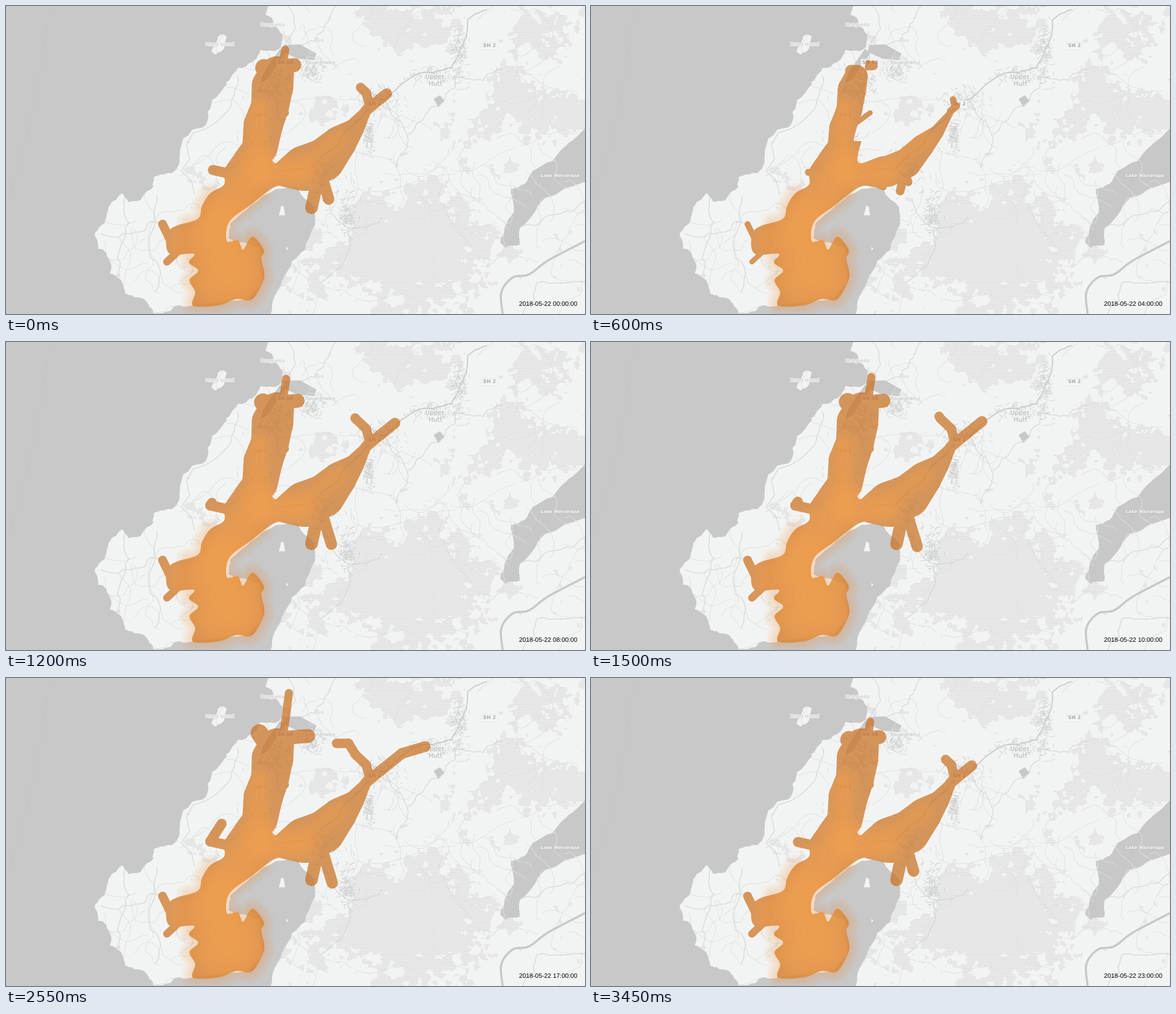
These frames come from a looping animation (921x490 px, 3.6 s). A matplotlib script:

```python
import numpy as np
import matplotlib.pyplot as plt
from matplotlib.animation import FuncAnimation
from matplotlib.collections import LineCollection
from matplotlib.patches import PathPatch
from matplotlib.path import Path
from matplotlib.patheffects import withStroke

W, H, DPI = 921, 490, 128
PX = 72 / DPI
HOURS, STEP_MS = 24, 150
plt.rcParams["text.hinting"] = "none"
rng = np.random.default_rng(7)

fig = plt.figure(figsize=(W / DPI, H / DPI), dpi=DPI, facecolor="#c8c8c8")
ax = fig.add_axes([0, 0, 1, 1])
ax.axis("off")


# ---------- geometry helpers ----------
def pts(*xy):
    return np.array(xy, float).reshape(-1, 2)


def smooth(p, sub=6):
    """Open Catmull-Rom curve through the points."""
    q = np.vstack([p[:1], p, p[-1:]])
    t = (np.arange(sub) / sub)[:, None]
    out = [b + 0.5 * t * (c - a + t * (2*a - 5*b + 4*c - d + t * (3*(b - c) + d - a)))
           for a, b, c, d in zip(q, q[1:], q[2:], q[3:])]
    return np.vstack(out + [p[-1:]])


def rough(p, amp=0.1, depth=3):
    """Midpoint displacement, for coastlines and winding roads."""
    for _ in range(depth):
        d = np.diff(p, axis=0)
        mid = (p[1:] + p[:-1]) / 2 + np.c_[-d[:, 1], d[:, 0]] * rng.normal(0, amp, (len(d), 1))
        out = np.empty((len(p) + len(mid), 2))
        out[::2], out[1::2] = p, mid
        p = out
    return p


def cut(p, share):
    """The first share of a polyline, measured along its length."""
    s = np.r_[0, np.cumsum(np.hypot(*np.diff(p, axis=0).T))]
    u = np.r_[s[s < share * s[-1]], share * s[-1]]
    return np.c_[np.interp(u, s, p[:, 0]), np.interp(u, s, p[:, 1])]


def capsule(a, b, ra, rb):
    """Outline around two circles."""
    d = max(np.hypot(*(b - a)), 1e-6)
    heading = np.arctan2(b[1] - a[1], b[0] - a[0])
    beta = np.arccos(np.clip((ra - rb) / d, -1, 1))
    front = heading + np.linspace(-beta, beta, 16)
    back = heading + np.linspace(beta, 2 * np.pi - beta, 16)
    return np.vstack([b + rb * np.c_[np.cos(front), np.sin(front)],
                      a + ra * np.c_[np.cos(back), np.sin(back)]])


def chain(p, radii):
    return [capsule(*link) for link in zip(p, p[1:], radii, radii[1:])]


def union(polys):
    """Compound path with every ring wound the same way."""
    rings = []
    for p in polys:
        x, y = p.T
        turn = np.sum(x * np.roll(y, -1) - y * np.roll(x, -1))
        p = p if turn > 0 else p[::-1]
        rings.append(Path(np.vstack([p, p[:1]]), closed=True))
    return Path.make_compound_path(*rings)


def area(polys, color, z):
    return ax.add_patch(PathPatch(union(polys), fc=color, ec="none", zorder=z))


def lines(paths, color, width, z, clip=None, **kw):
    col = ax.add_collection(LineCollection(paths, colors=color, linewidths=width * PX,
                                           zorder=z, **kw))
    if clip is not None:
        col.set_clip_path(clip)


def noise(cell):
    """Smooth random field over the stage."""
    grid = rng.normal(size=(H // cell + 2, W // cell + 2))
    y, x = np.arange(H) / cell, np.arange(W) / cell
    i, j = y.astype(int), x.astype(int)
    v, u = (y - i)[:, None], x - j
    top = grid[i][:, j] * (1 - u) + grid[i][:, j + 1] * u
    low = grid[i + 1][:, j] * (1 - u) + grid[i + 1][:, j + 1] * u
    return top * (1 - v) + low * v


yy, xx = np.mgrid[0:H, 0:W] + 0.5

# ---------- land and water ----------
west_coast = pts(417, 0, 413, 14, 440, 45, 437, 66, 405, 70, 394, 88, 368, 99, 347, 129, 322, 176,
                 318, 189, 296, 197, 264, 266, 235, 272, 234, 288, 196, 312, 184, 298, 162, 325,
                 142, 360, 146, 386, 160, 394, 165, 425, 190, 458, 212, 464, 234, 489, 290, 478)
bay = pts(300, 476, 385, 467, 408, 438, 405, 385, 354, 370, 357, 346, 390, 317, 430, 291, 465, 291,
          490, 320, 492, 347, 476, 388, 455, 406, 440, 436, 427, 462, 421, 490)
mana = pts(341, 46, 351, 50, 345, 70, 333, 77, 327, 73, 341, 46)
somes = pts(438, 317, 442, 320, 444, 333, 434, 333)
ward = pts(446, 383, 449, 386, 446, 389)
land = area([np.vstack([rough(west_coast), rough(bay, 0.05, 2), pts(W, H, W, 0)]),
             rough(mana), somes, ward], "#f2f4f3", 1)
lake = pts(W, 194, 892, 221, 838, 262, 803, 292, 808, 328, 786, 376, 794, 384, 817, 380, 817, 354,
           850, 313, 890, 290, W, 280)
inlet = pts(442, 62, 468, 61, 494, 76, 490, 86, 464, 84, 440, 73)
arm = pts(436, 68, 444, 76, 414, 118, 404, 122, 412, 102)
pond = pts(680, 148, 690, 142, 697, 150, 688, 161)
area([rough(lake, 0.05), inlet, arm, pond], "#c8c8c8", 3)

# Wooded hills: x, y, spread x, spread y, density
cover = 0.28 * noise(26) + 0.22 * noise(9) + 0.12 * noise(4)
for x, y, sx, sy, density in [(655, 390, 105, 110, 1.5), (640, 35, 85, 55, 1.0),
                              (850, 45, 75, 50, 0.9), (815, 165, 110, 60, 1.0),
                              (500, 168, 45, 28, 0.8), (475, 430, 45, 70, 0.7)]:
    cover += density * np.exp(-((xx - x) / sx) ** 2 - ((yy - y) / sy) ** 2)
woods = np.zeros((H, W, 4))
woods[..., :3] = np.where(np.arange(H) % 3 == 0, 0.878, 0.918)[:, None, None]
woods[..., 3] = cover > 0.55
ax.imshow(woods, extent=(0, W, H, 0), zorder=2, interpolation="nearest",
          aspect="auto").set_clip_path(land)

# ---------- roads ----------
tracks = []
for _ in range(120):
    heading = np.cumsum(rng.normal(0, 0.3, 26)) + rng.uniform(0, 2 * np.pi)
    steps = 4 * np.c_[np.cos(heading), np.sin(heading)]
    tracks.append(rng.uniform((150, 0), (W, H)) + np.cumsum(steps, axis=0))
lines(tracks, "#dfe1e1", 0.9, 3.1, land)

local_roads = [
    pts(188, 300, 196, 345, 185, 375, 180, 430), pts(240, 300, 228, 380, 238, 455),
    pts(150, 362, 200, 362, 243, 345), pts(368, 110, 350, 170, 300, 300),
    pts(448, 0, 443, 68, 404, 175, 350, 345), pts(525, 0, 505, 40, 470, 62),
    pts(605, 160, 640, 215, 620, 255), pts(640, 205, 700, 140, 745, 118, 790, 100),
    pts(512, 310, 542, 352, 575, 352, 600, 336), pts(545, 352, 548, 380, 500, 440),
    pts(820, 350, 870, 332, W, 310), pts(822, 490, 845, 440, W, 440),
]
lines([rough(r) for r in local_roads], "#d1d3d3", 1, 3.2, land)
highway = pts(425, 270, 480, 262, 530, 220, 575, 165, 650, 110, 708, 98, 732, 50, 734, 22, 765, 6)
lines([rough(highway, 0.07)], "#c6c8c8", 1.6, 3.4, land)
river = pts(790, 490, 788, 455, 806, 432, 832, 427, 862, 405, W, 374)
lines([smooth(river)], "#c8c8c8", 3.4, 3.4)
bounds = [pts(600, 265, 665, 268, 695, 256, 740, 262, 810, 225),
          pts(697, 258, 689, 310, 742, 385), pts(452, 152, 490, 146, 562, 150)]
lines([rough(b, 0.06) for b in bounds], "#cccece", 1, 3.4, linestyles="dotted")
lines([smooth(pts(70, 0, 44, 160, 4, 312))], "#c2c3c3", 0.8, 1, linestyles="dashed")

# Street grids: x, y, spread x, spread y, slope
streets = []
for x, y, sx, sy, slope in [(428, 125, 14, 18, 0.9), (684, 112, 24, 9, -0.4),
                            (543, 330, 7, 20, 1.1), (500, 262, 14, 20, -0.8),
                            (335, 400, 24, 34, 0.3), (487, 102, 11, 8, 0.5),
                            (405, 240, 14, 24, 0.7), (722, 70, 6, 22, 1.2),
                            (578, 205, 4, 12, 0.2), (595, 150, 16, 12, -0.7)]:
    for center in rng.normal((x, y), (sx, sy), (90, 2)):
        a = slope + rng.choice([0, np.pi / 2]) + rng.normal(0, 0.25)
        half = rng.uniform(1.5, 5) * np.array([np.cos(a), np.sin(a)])
        streets.append([center - half, center + half])
lines(streets, "#cbcdcd", 0.7, 3.5, land)


# ---------- labels ----------
def label(x, y, text, size=7.6, color="#b9bbbb", halo="#f4f5f5", **kw):
    ax.text(x, y, text, fontsize=size * PX, color=color, ha="center", va="center",
            family="DejaVu Sans", zorder=4,
            path_effects=[withStroke(linewidth=1.6 * PX, foreground=halo)], **kw)


label(340, 61, "Mana Island", color="#c4c5c5")
label(424, 30, "Hongoeka", color="#c4c5c5")
label(500, 90, "Pauatahanui")
label(417, 136, "Porirua", 9.5)
label(682, 113, "Upper", 10, "#adafaf")
label(683, 124, "Hutt", 10, "#adafaf")
label(881, 270, "Lake Wairarapa", 7, "#fafafa", "#bdbdbd", style="italic", weight="bold")
for x, y, name in [(769, 63, "SH 2"), (586, 156, "SH 2"), (405, 174, "SH 1"), (444, 90, "SH 58")]:
    label(x, y, name, 7.8, "#a9abab", weight="bold",
          bbox=dict(fc="#f6f7f7", ec="#dcdede", lw=0.5 * PX, pad=1.0))

# ---------- reachable area ----------
city = smooth(pts(
    379, 214, 362, 238, 347, 262, 347, 284, 325, 298, 312, 318, 305, 339, 270, 350, 256, 364,
    260, 394, 299, 394, 291, 408, 306, 421, 292, 436, 301, 455, 296, 472, 303, 478, 340, 476,
    366, 466, 391, 467, 408, 440, 411, 425, 406, 402, 410, 388, 392, 367, 377, 388, 369, 373,
    351, 374, 355, 343, 388, 317, 427, 288, 450, 288, 470, 290, 470, 240, 426, 250, 430, 215))

# Valley trunks as x, y, radius, with the shift they take at night
trunks = [
    (np.array([(404, 225, 28), (409, 190, 31), (420, 160, 30), (424, 128, 33), (431, 107, 27)]),
     (-9, 5)),
    (np.array([(445, 266, 22), (475, 258, 36), (505, 245, 34), (530, 218, 27), (553, 196, 16),
               (575, 164, 7)]), (-3, 5)),
]
# Branches that lengthen with the reach: path, radius, gain
branches = [
    (pts(440, 98, 445, 62, 451, 17), 6.5, 1),
    (pts(445, 95, 484, 92), 11, 1),
    (pts(415, 105, 402, 86), 14, 1),
    (pts(572, 167, 595, 148, 630, 120, 677, 106), 8.5, 1),
    (pts(578, 157, 573, 138, 556, 122, 545, 104, 518, 104), 7.5, 1),
    (pts(497, 270, 486, 321), 10, 5),
    (pts(502, 270, 519, 326), 9, 1.9),
    (pts(352, 266, 325, 260, 346, 227), 8, 1),
    (pts(266, 382, 249, 347), 7, 20),
    (pts(272, 392, 256, 407), 6, 20),
    (pts(410, 195, 444, 170), 6, 20),
]


def reachable(hour):
    night = 1 <= hour <= 6
    width = 0.68 if night else 1
    reach = 0.08 + 0.004 * hour if night else np.interp(
        hour, [0, 10, 13, 16, 19, 23], [0.35, 0.52, 1, 1, 0.74, 0.35])
    shapes = [city]
    for nodes, shift in trunks:
        spine = nodes[:, :2] + (shift if night else (0, 0))
        shapes += chain(spine, nodes[:, 2] * width)
    for path, radius, gain in branches:
        part = cut(path, min(1, reach * gain))
        shapes += chain(part, [radius * width] * len(part))
    return union(shapes)


def warmth(x0, y0, x1, y1, radius, strength):
    dx, dy = x1 - x0, y1 - y0
    t = np.clip(((xx - x0) * dx + (yy - y0) * dy) / (dx * dx + dy * dy), 0, 1)
    d = np.hypot(xx - x0 - t * dx, yy - y0 - t * dy)
    return strength * np.exp(-(d / radius) ** 2.4)


cool = np.ones((H, W))
for spot in [(342, 355, 342, 430, 58, 0.85), (375, 405, 380, 430, 38, 0.6),
             (350, 335, 400, 262, 38, 0.7), (400, 262, 402, 165, 20, 0.6),
             (410, 262, 470, 266, 26, 0.6), (460, 262, 530, 212, 17, 0.45),
             (275, 375, 330, 370, 24, 0.4)]:
    cool *= 1 - warmth(*spot)
heat = np.empty((H, W, 4))
heat[..., :3] = np.array([242, 160, 78]) / 255
heat[..., 3] = 0.88 * (1 - cool)

# Soft halo around the southern shore
south = city[(city[:, 1] > 296) & (city[:, 0] > 285)]
for width in range(4, 40, 4):
    lines([south], (0.95, 0.62, 0.3, 0.035), width, 4.5, capstyle="round", joinstyle="round")

reach_patch = ax.add_patch(PathPatch(reachable(0), fc=(0.79, 0.44, 0.13, 0.72), ec="none",
                                     zorder=5))
heat_image = ax.imshow(heat, extent=(0, W, H, 0), zorder=6, interpolation="nearest",
                       aspect="auto")
clock = ax.text(909, 478, "", fontsize=10 * PX, family="Liberation Sans", color="black",
                ha="right", va="baseline", zorder=8)
ax.set_xlim(0, W)
ax.set_ylim(H, 0)


def update(hour):
    reach_patch.set_path(reachable(hour))
    heat_image.set_clip_path(reach_patch)
    clock.set_text(f"2018-05-22 {hour:02d}:00:00")
    return reach_patch, heat_image, clock


anim = FuncAnimation(fig, update, frames=HOURS, interval=STEP_MS, repeat=True, repeat_delay=0)
plt.show()
```
